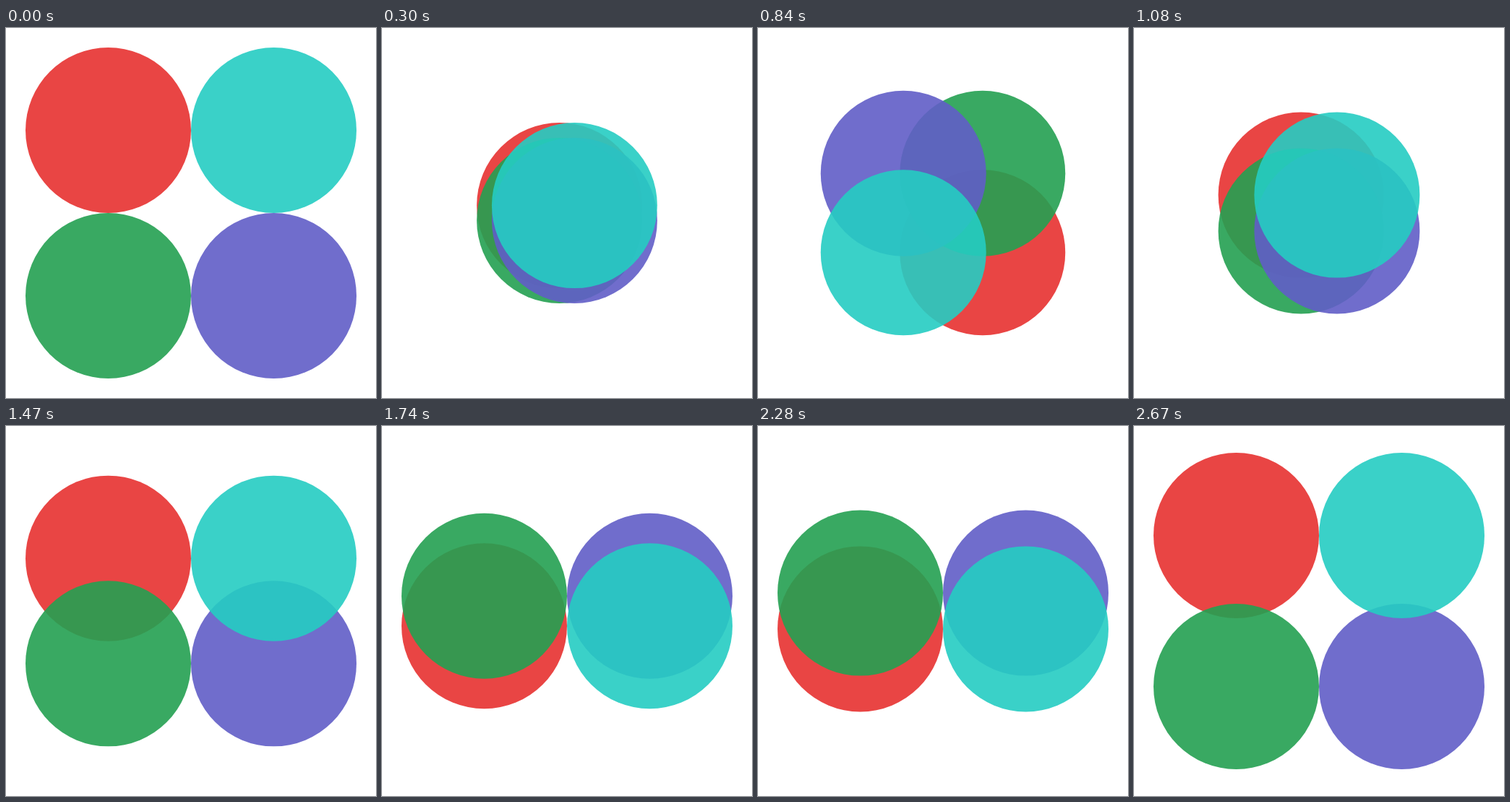
Write an HTML page with a canvas that moves like this. It is 512 by 512 pixels and loops after 2700 ms.

```html
<!DOCTYPE html>
<html lang="en">
<head>
<meta charset="utf-8">
<title>Crossing circles</title>
<style>
  html, body { margin: 0; width: 100%; height: 100%; overflow: hidden; background: #fff; }
  canvas { display: block; width: 512px; height: 512px; }
</style>
</head>
<body>
<canvas id="stage" width="512" height="512"></canvas>
<script>
const ctx = document.getElementById('stage').getContext('2d');
const CENTER = 256;
const RADIUS = 114.5;
const STEP_MS = 30;
const LOOP_STEPS = 90;
const HALF_STEPS = 45;
const OUT_STEPS = 22;

// Listed from back to front; x and y give the home corner.
const circles = [
  { x: -1, y: -1, color: 'rgb(231, 49, 48)' },
  { x: -1, y: 1, color: 'rgb(36, 160, 82)' },
  { x: 1, y: 1, color: 'rgb(97, 94, 199)' },
  { x: 1, y: -1, color: 'rgb(37, 204, 195)' }
];

// Linear swing from 1 to -1 and back again.
function swing(step) {
  return step < OUT_STEPS
    ? 1 - 2 * step / OUT_STEPS
    : -1 + 2 * (step - OUT_STEPS) / (HALF_STEPS - OUT_STEPS);
}

function draw(ms) {
  const step = Math.floor((ms + 0.5) / STEP_MS) % LOOP_STEPS;
  const scaleY = swing(step % HALF_STEPS);
  const scaleX = step < HALF_STEPS ? scaleY : 1; // diagonal first, then vertical

  ctx.globalAlpha = 1;
  ctx.fillStyle = '#fff';
  ctx.fillRect(0, 0, 512, 512);
  ctx.globalAlpha = 0.9;
  for (const { x, y, color } of circles) {
    ctx.fillStyle = color;
    ctx.beginPath();
    ctx.arc(CENTER + x * scaleX * RADIUS, CENTER + y * scaleY * RADIUS, RADIUS, 0, Math.PI * 2);
    ctx.fill();
  }
}

const start = performance.now();
function tick() {
  draw(performance.now() - start);
  requestAnimationFrame(tick);
}
tick();
</script>
</body>
</html>
```
